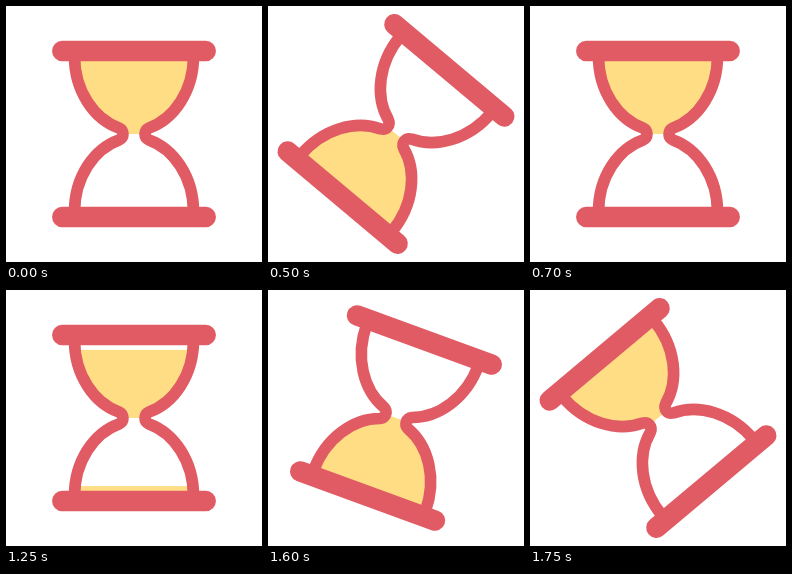
Write an HTML page that moves like this. It is 256 px wide and 256 px high and loops after 1800 ms.

```html
<!DOCTYPE html>
<html lang="en">
<head>
<meta charset="utf-8">
<title>Hourglass</title>
<style>
  html, body { margin: 0; width: 100%; height: 100%; overflow: hidden; background: #fff; }
  svg { display: block; width: 100%; height: 100%; }
  .frame { fill: none; stroke: #e15b64; }
  .sand { fill: #ffdd85; }
</style>
</head>
<body>
<svg viewBox="0 0 256 256">
  <defs>
    <path id="side" d="M68.5 45V50C68.5 85 88 113 113 122Q117 124 117 128Q117 132 113 134C88 143 68.5 171 68.5 206V211"/>
    <clipPath id="inside">
      <path d="M68.5 45V50C68.5 85 88 113 113 122Q117 124 117 128Q117 132 113 134C88 143 68.5 171 68.5 206V211H128V45Z"/>
      <path d="M187.5 45V50C187.5 85 168 113 143 122Q139 124 139 128Q139 132 143 134C168 143 187.5 171 187.5 206V211H128V45Z"/>
    </clipPath>
  </defs>
  <g id="hourglass">
    <g class="sand" clip-path="url(#inside)">
      <rect id="upper" x="60" width="136"/>
      <rect id="lower" x="60" width="136"/>
    </g>
    <g class="frame" stroke-width="11.6">
      <use href="#side"/>
      <use href="#side" transform="matrix(-1 0 0 1 256 0)"/>
    </g>
    <path class="frame" stroke-width="20.5" stroke-linecap="round" d="M56.3 45H199.7M56.3 211H199.7"/>
  </g>
</svg>
<script>
  const LOOP = 1800, STEP = 50, CYCLE = 1125;
  const DRAIN_START = 50, DRAIN_END = 450, TURN = 225;
  const FULL = 55.3, NECK = 128;

  const byId = id => document.getElementById(id);
  const progress = (t, start, length) => Math.min(1, Math.max(0, (t - start) / length));

  function setSpan(rect, top, bottom) {
    rect.setAttribute("y", top);
    rect.setAttribute("height", Math.max(0, bottom - top));
  }

  function draw(now) {
    const t = Math.floor((now % LOOP) / STEP) * STEP;
    const clock = t % CYCLE;

    // The level sinks ever faster, then the glass turns at an even speed.
    const drained = progress(clock, DRAIN_START, DRAIN_END - DRAIN_START) ** 1.65;
    const drop = (NECK - FULL) * drained;
    setSpan(byId("upper"), drained ? FULL + drop : 45, NECK);
    setSpan(byId("lower"), 256 - FULL - drop, drained ? 211 : 0);

    const angle = 180 * progress(clock, DRAIN_END, TURN);
    byId("hourglass").setAttribute("transform", `rotate(${angle} 128 128)`);
  }

  const begin = performance.now();
  function tick() {
    draw(performance.now() - begin);
    requestAnimationFrame(tick);
  }
  tick();
</script>
</body>
</html>
```
